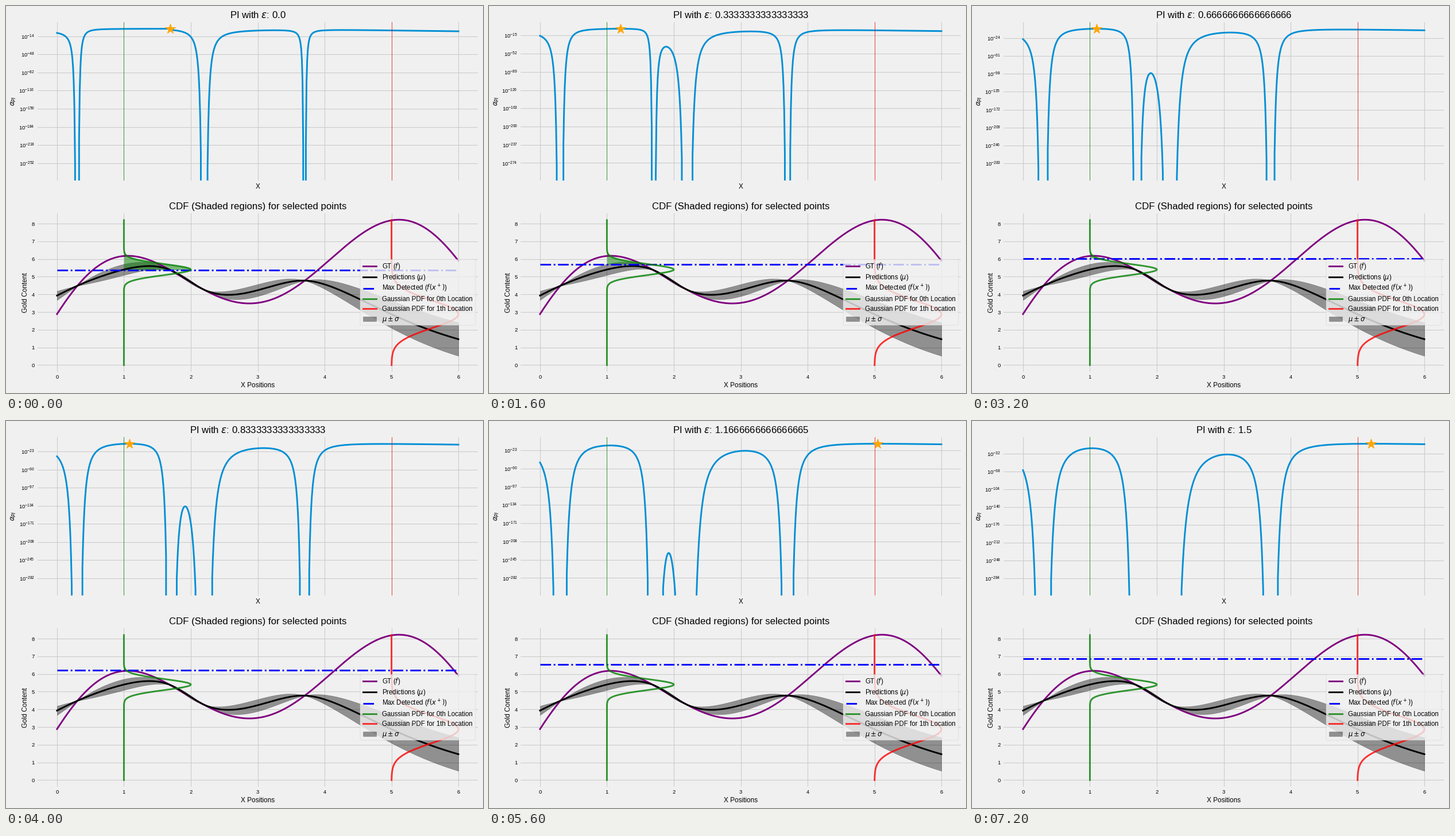
Animation of 831 by 674 pixels, one loop 8000 ms. Source, as a matplotlib script:

```python
import math
import numpy as np
import matplotlib.pyplot as plt
from matplotlib.animation import FuncAnimation
from matplotlib.patches import FancyBboxPatch, Rectangle

W, H, DPI = 831, 674, 100
PX = 72 / DPI  # points per pixel
BG, GRID = "#f0f0f0", "#cbcbcb"
LW = 2.9 * PX

plt.rcParams.update({
    "font.family": "Liberation Sans",
    "mathtext.fontset": "dejavusans",
})


def matern(a, b, length=1.67):
    s = math.sqrt(3) * np.abs(np.subtract.outer(a, b)) / length
    return (1 + s) * np.exp(-s)


def smooth(a, b, length=1.4):
    return np.exp(-np.subtract.outer(a, b) ** 2 / (2 * length ** 2))


def regress(kernel, px, py, x, noise):
    """Gaussian process mean and deviation at x."""
    gain = np.linalg.solve(kernel(px, px) + noise * np.eye(len(px)), kernel(px, x))
    var = 1 - np.sum(kernel(px, x) * gain, axis=0)
    return py @ gain, np.sqrt(np.maximum(var, 1e-10))


def log_cdf(z):
    p = np.array([0.5 * math.erfc(-v / math.sqrt(2)) for v in z])
    out = np.full(len(z), -5000.0)
    out[p > 0] = np.log10(p[p > 0])
    return out


x = np.linspace(0, 6, 601)

# underlying truth, through a few knots
knot_x = np.array([0, .3, .6, 1.06, 1.4, 1.7, 2.2, 2.5, 2.87,
                   3.3, 3.7, 4.3, 4.7, 5.12, 5.5, 5.8, 6])
knot_y = np.array([2.87, 4.48, 5.58, 6.16, 5.91, 5.37, 4.26, 3.74, 3.48,
                   3.84, 4.78, 6.68, 7.78, 8.2, 7.79, 6.79, 5.89])
truth = regress(smooth, knot_x, knot_y - 5.5, x, 1e-4)[0] + 5.5

# surrogate fitted to four samples
seen_x = np.array([.3, 1.7, 2.2, 3.7])
seen_y = np.array([4.48, 5.37, 4.26, 4.78])
mu, sigma = regress(matern, seen_x, seen_y, x, 1e-10)
best = seen_y[1]
top = 8.2

epsilons = np.linspace(0, 1.5, 10)
lows = [-285.2, -292.3, -310.4, -322.7, -319.5, -318.5, -320.7, -318.4, -310.2, -319.4]

fig = plt.figure(figsize=(W / DPI, H / DPI), dpi=DPI, facecolor=BG)


def make_axes(y0, y1):
    ax = fig.add_axes([53.89 / W, 1 - y1 / H, 769.23 / W, (y1 - y0) / H], facecolor=BG)
    ax.set_xlim(-.3, 6.3)
    ax.set_xticks(range(7))
    ax.grid(color=GRID, lw=1.1 * PX)
    ax.set_axisbelow(True)
    ax.tick_params(length=0, pad=4 * PX, labelsize=9.5 * PX)
    for spine in ax.spines.values():
        spine.set(color=BG, linewidth=2.2 * PX)
    return ax


ax1 = make_axes(27, 304.7)
ax2 = make_axes(360.3, 638)
ax1.tick_params(labelbottom=False)
ax2.set_ylim(-.05 * top, 1.05 * top)
ax2.set_yticks(range(9))

# acquisition panel
curve, = ax1.plot(x, x, color="#008fd5", lw=LW)
for pos, color in ((1, "green"), (5, "red")):
    ax1.axvline(pos, color=color, lw=1 * PX, alpha=.7)
star, = ax1.plot([0], [0], "*", color="orange", ms=18 * PX, mew=1 * PX, zorder=5)

# surrogate panel
ax2.plot(x, truth, color="purple", lw=LW)
ax2.plot(x, mu, color="black", lw=LW)
level, = ax2.plot(x, x, color="blue", ls="-.", lw=LW)
ax2.fill_between(x, mu - sigma, mu + sigma, color="black", alpha=.4, lw=.5 * PX)

gold = np.linspace(0, top, 800)
bells = []
for pos, color in ((1, "green"), (5, "red")):
    i = pos * 100
    bell = pos + np.exp(-.5 * ((gold - mu[i]) / sigma[i]) ** 2)
    ax2.plot(bell, gold, color=color, alpha=.8, lw=LW)
    bells.append((pos, bell, color))
shades = []

# overlay in pixel coordinates for captions and legend
page = fig.add_axes([0, 0, 1, 1], zorder=10)
page.set_xlim(0, W)
page.set_ylim(H, 0)
page.axis("off")


def write(px, py, s, size=11.7, **kw):
    return page.text(px, py, s, fontsize=size * PX, color="black", **kw)


title = write(438.5, 21, "", 16.8, ha="center")
write(438.5, 354, "CDF (Shaded regions) for selected points", 16.8, ha="center")
write(438.5, 318, "X", ha="center")
write(438.5, 664, "X Positions", ha="center")
write(13, 166, r"$\alpha_{PI}$", ha="center", va="center", rotation=90)
write(34, 499, "Gold Content", ha="center", va="center", rotation=90)

page.add_patch(FancyBboxPatch((619, 443.4), 197, 110.6, boxstyle="round,pad=2",
                              fc=BG, ec=GRID, lw=.5 * PX, alpha=.8))
entries = [
    (452.5, "GT ($f$)", "purple", "-", 1),
    (472, r"Predictions ($\mu$)", "black", "-", 1),
    (491.5, "Max Detected ($f(x^+)$)", "blue", "-.", 1),
    (509.5, "Gaussian PDF for 0th Location", "green", "-", .8),
    (527, "Gaussian PDF for 1th Location", "red", "-", .8),
    (545, r"$\mu \pm \sigma$", None, None, 1),
]
for y, text, color, style, alpha in entries:
    if color:
        page.plot([622, 645], [y, y], color=color, ls=style, lw=LW, alpha=alpha)
    else:
        page.add_patch(Rectangle((622, y - 4.5), 23, 8.5, color="black", alpha=.4,
                                 lw=.5 * PX))
    write(655, y + 4.2, text, 11.56)


def draw(n):
    eps = float(epsilons[n])
    low = lows[n]

    # the margin enters the score twice
    score = log_cdf((mu - best - 2 * eps) / sigma)
    peak = int(np.argmax(score))
    high = low + (score[peak] - low) * 1.1 / 1.05
    curve.set_ydata(score)
    star.set_data([x[peak]], [score[peak]])
    ax1.set_ylim(low, high)

    first = math.floor(low)
    stride = (math.ceil(high) - first) // 9 + 1
    ticks = [t for t in range(first + stride, 0, stride) if t < high]
    ax1.set_yticks(ticks, [rf"$\mathdefault{{10^{{{t}}}}}$" for t in ticks])

    title.set_text(rf"PI with $\varepsilon$: {eps}")
    line = best + eps
    level.set_ydata(np.full(len(x), line))
    while shades:
        shades.pop().remove()
    for pos, bell, color in bells:
        shades.append(ax2.fill_betweenx(gold, pos, bell, where=gold >= line,
                                        color=color, alpha=.5, lw=0))
    return []


anim = FuncAnimation(fig, draw, frames=len(epsilons), interval=800,
                     repeat=True, repeat_delay=0, blit=False)
plt.show()
```
